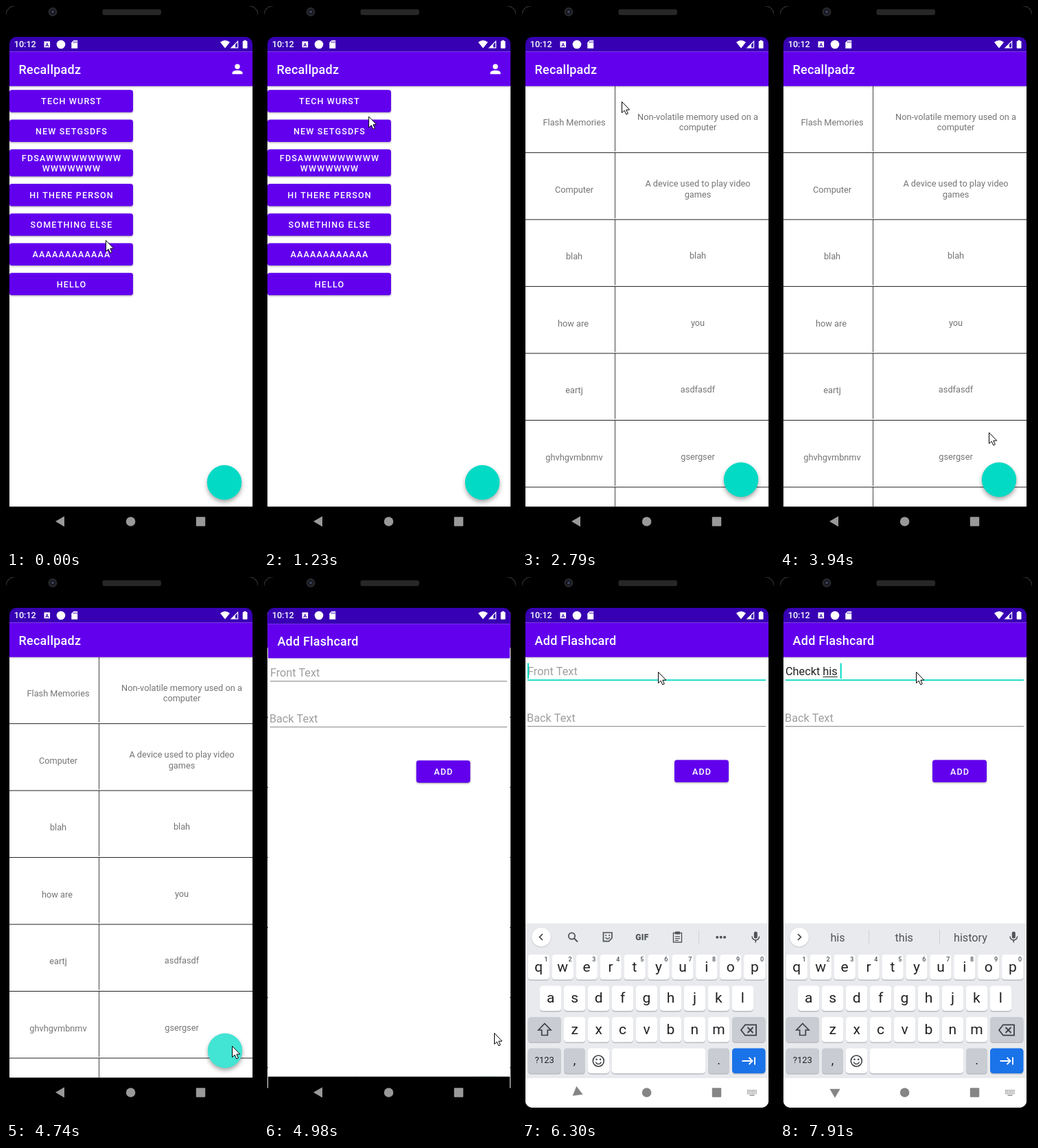
An HTML page with a canvas that plays this animation: 367x791 px, repeating every 8000 ms.

```html
<!DOCTYPE html>
<html lang="en">
<head>
<meta charset="utf-8">
<title>Study cards</title>
<style>
html, body { margin: 0; width: 100%; height: 100%; overflow: hidden; background: #000; }
canvas { display: block; width: 367px; height: 791px; }
</style>
</head>
<body>
<canvas id="stage"></canvas>
<script>
const W = 367, H = 791, LOOP = 8000, STEP = 120;
const canvas = document.getElementById('stage');
const dpr = window.devicePixelRatio || 1;
canvas.width = W * dpr;
canvas.height = H * dpr;
const c = canvas.getContext('2d');

const PURPLE = '#6200ee', DARK = '#3700b3', TEAL = '#03dac5';
const INK = '#202124', SLATE = '#3c4043', GREY = '#505357';
const SCREEN = { x: 5, y: 45, w: 354, h: 728, midX: 182, midY: 409 };
const PRESS_SET = 2250, OPEN_SET = 2520, PRESS_FAB = 4620, OPEN_ADD = 4860;
const FOCUS = 5880, KEYS_UP = 6180, BLINK = 6570, TYPE = 6950;

// Mouse key points: time, x, y
const mousePath = [[0, 145, 341], [360, 330, 430], [600, 168, 204], [1470, 145, 141],
  [1720, 145, 139], [3070, 145, 139], [3320, 159, 181], [3940, 304, 621], [4480, 329, 683],
  [4860, 329, 683], [4980, 335, 664], [5490, 245, 187], [5880, 198, 138]];

const sets = ['TECH WURST', 'NEW SETGSDFS', 'FDSA' + 'W'.repeat(9) + '\n' + 'W'.repeat(7),
  'HI THERE PERSON', 'SOMETHING ELSE', 'A'.repeat(12), 'HELLO'];
const cards = [
  ['Flash Memories', 'Non-volatile memory used on a\ncomputer'],
  ['Computer', 'A device used to play video\ngames'],
  ['blah', 'blah'], ['how are ', 'you'], ['eartj', 'asdfasdf'], ['ghvhgvmbnmv', 'gsergser']];
const keystrokes = 'Checkt his '.match(/ ?\S( $)?/g);
const vocabulary = ['his', 'this', 'history', 'check', 'checked', 'checking'];

const clamp = v => Math.max(0, Math.min(1, v));
const lerp = (a, b, p) => a + (b - a) * p;
const elapsed = (t, start) => Math.floor((t - start) / STEP) * STEP;

// Drawing helpers
function rect(x, y, w, h, color) { c.fillStyle = color; c.fillRect(x, y, w, h); }
function round(x, y, w, h, r, color) {
  c.beginPath(); c.roundRect(x, y, w, h, r); c.fillStyle = color; c.fill();
}
function disc(x, y, r, color) {
  c.beginPath(); c.arc(x, y, r, 0, 7); c.fillStyle = color; c.fill();
}
function poly(points, color) {
  c.beginPath(); points.forEach(([x, y]) => c.lineTo(x, y)); c.closePath();
  c.fillStyle = color; c.fill();
}
function line(points, color, width = 1.7, closed = false) {
  c.beginPath(); points.forEach(([x, y]) => c.lineTo(x, y));
  if (closed) c.closePath();
  c.strokeStyle = color; c.lineWidth = width; c.stroke();
}
function ring(x, y, r, color, width = 1.7, from = 0, to = 7) {
  c.beginPath(); c.arc(x, y, r, from, to);
  c.strokeStyle = color; c.lineWidth = width; c.stroke();
}
function text(str, x, y, size, color, { weight = 400, align = 'left', gap = 0 } = {}) {
  c.font = `${weight} ${size}px Roboto, sans-serif`;
  c.textAlign = align;
  c.letterSpacing = gap + 'px';
  c.fillStyle = color;
  c.fillText(str, x, y);
  const width = c.measureText(str).width;
  c.letterSpacing = '0px';
  return width;
}
function centered(str, x, y, size, color, style) {
  text(str, x, y, size, color, { align: 'center', ...style });
}
function paragraph(str, x, y, size, leading, color, style) {
  const lines = str.split('\n');
  lines.forEach((s, i) =>
    centered(s, x, y + (i - (lines.length - 1) / 2) * leading, size, color, style));
}
function shadowed(alpha, blur, dy, draw) {
  c.save();
  c.shadowColor = `rgba(0,0,0,${alpha})`;
  c.shadowBlur = blur * dpr;
  c.shadowOffsetY = dy * dpr;
  draw();
  c.restore();
}
function ripple(shape, x, y, r) {
  c.save(); c.beginPath(); shape(); c.clip();
  disc(x, y, r, 'rgba(255,255,255,.25)');
  c.restore();
}

// App screens
function button(label, x, y, w, press) {
  const h = label.includes('\n') ? 39.5 : 32.5;
  shadowed(0.32, 2.5, 1.2, () => round(x, y, w, h, 3.6, PURPLE));
  if (press) ripple(() => c.roundRect(x, y, w, h, 3.6), ...press);
  paragraph(label, x + w / 2 + 0.5, y + h / 2 + 4.7, 12.6, 14.8, '#fff', { weight: 500, gap: 1.125 });
}
function fab(x, y, press) {
  shadowed(0.35, 6, 3.5, () => disc(x, y, 25.2, TEAL));
  if (press) ripple(() => c.arc(x, y, 25.2, 0, 7), ...press);
}
function appWindow(title, body) {
  rect(5, 45, 354, 22, DARK);
  rect(5, 66.5, 354, 663, '#fff');
  rect(5, 729.5, 354, 43.5, '#000');
  body();
  c.save();
  c.beginPath(); c.rect(5, 66, 354, 663); c.clip();
  shadowed(0.3, 3, 1, () => rect(5, 66.5, 354, 50.2, PURPLE));
  c.restore();
  text(title, 18.6, 98.8, 18, '#fff', { weight: 500, gap: 0.225 });
}
function setsScreen(t) {
  const p = clamp(elapsed(t, PRESS_SET) / STEP);
  const press = t >= PRESS_SET && [lerp(142, 118, p), 139, lerp(36, 82, p)];
  appWindow('Recallpadz', () => {
    let y = 122.3;
    sets.forEach((s, i) => {
      button(s, 5, y, 180, i === 0 && press);
      y += s.includes('\n') ? 50.2 : 43.25;
    });
    fab(318, 694);
  });
  disc(337, 88.2, 3.7, '#fff');
  c.beginPath(); c.moveTo(329.5, 99.2); c.lineTo(329.5, 97.4);
  c.bezierCurveTo(329.5, 92.4, 344.5, 92.4, 344.5, 97.4); c.lineTo(344.5, 99.2);
  c.fill();
}
function cardsScreen(t) {
  const p = clamp((elapsed(t, PRESS_FAB) + 80) / 200);
  const press = t >= PRESS_FAB && [lerp(329, 319, p), lerp(683, 690, p), lerp(8, 26, p)];
  appWindow('Recallpadz', () => {
    for (let i = 0; i < 7; i++) {
      const y = 115.7 + i * 97.45;
      rect(135, y, 1, Math.min(96, 729.5 - y), '#444');
      if (i) rect(5, y, 354, 1, '#222');
      if (!cards[i]) continue;
      const [front, back] = cards[i];
      centered(front, 76, y + 58.6, 12.75, '#757575');
      paragraph(back, 256, y + 57.8, 12.75, 15.3, '#757575');
    }
    fab(319, 690, press);
  });
}
function typedText(t) {
  return t < TYPE ? '' : keystrokes.slice(0, 1 + elapsed(t, TYPE) / STEP).join('');
}
function addScreen(t) {
  const focused = t >= FOCUS, str = typedText(t);
  appWindow('Add Flashcard', () => {
    let caret = 8;
    if (str) {
      caret += text(str, 8, 143.2, 16.3, '#222');
      const start = str.trim().lastIndexOf(' ') + 1;
      const from = 8 + c.measureText(str.slice(0, start)).width;
      rect(from, 145, c.measureText(str.slice(start).trim()).width, 1, '#222');
    } else text('Front Text', 8, 143.2, 16.3, '#9e9e9e');
    if (focused) {
      rect(8, 149.3, 347, 1.8, TEAL);
      if (t < BLINK || str) rect(caret, 125.5, 2, 22.5, TEAL);
    } else rect(8, 150, 347, 1, '#7c7c7c');
    text('Back Text', 7, 210.7, 16.3, '#9e9e9e');
    rect(8, 217, 347, 1, '#8a8a8a');
    button('ADD', 222, 266.6, 79);
  });
}

// Keyboard
function key(x, y, w, color, label, size) {
  round(x, y + 1, w, 37, 4.5, '#b9bcc2');
  round(x, y, w, 36.6, 4.5, color);
  if (label) centered(label, x + w / 2, y + 17 + size * 0.37, size, INK);
}
function mic() {
  round(337.8, 516.5, 5, 10, 2.5, GREY);
  ring(340.3, 523.6, 5.3, GREY, 1.5, 0, Math.PI);
  rect(339.5, 528.5, 1.6, 4, GREY);
}
function toolIcons() {
  ring(72.5, 523, 4.6, GREY, 1.8);
  line([[76, 526.5], [81, 531.5]], GREY, 2);
  line([[118.5, 518], [131, 518], [131, 526], [126.5, 530.7], [118.5, 530.7]], GREY, 1.7, true);
  disc(122.2, 522, 1.1, GREY); disc(127.2, 522, 1.1, GREY);
  ring(124.7, 524, 3, GREY, 1.4, 0.2, 2.9);
  centered('GIF', 175, 528.5, 12, GREY, { weight: 900, gap: 0.4 });
  c.strokeRect(220.5, 518.5, 12, 13.5);
  rect(223, 516.5, 7, 4, GREY);
  for (let i = 0; i < 3; i++) {
    rect(223, 523.2 + i * 2.8, i < 2 ? 7 : 5, 1.2, GREY);
    disc(284.3 + i * 5.4, 524.7, 2, GREY);
  }
  rect(257, 515, 1, 20, '#cfd1d5');
}
function suggestions(str) {
  const word = str.trim().split(' ').pop();
  const capital = word !== word.toLowerCase();
  vocabulary.filter(w => w.includes(word.toLowerCase().slice(0, 5))).slice(capital ? -3 : 0)
    .slice(0, 3).forEach((w, i) => {
      centered(capital ? w[0].toUpperCase() + w.slice(1) : w, 84 + 96.7 * i, 531, 16.2, GREY);
      if (i) rect(26 + 103 * i, 514, 1, 21, '#cfd1d5');
    });
}
function keyboard(t) {
  const str = typedText(t), d = str ? -1 : 1;
  rect(5, 504.5, 354, 269, '#e8eaed');
  shadowed(0.2, 2, 0.7, () => disc(28, 524.6, 13.8, '#fff'));
  line([[28 + 2 * d, 520], [28 - 2.4 * d, 524.5], [28 + 2 * d, 529]], SLATE);
  if (str) suggestions(str); else toolIcons();
  mic();

  const pitch = 34.95, rowY = r => 550 + r * 45.5;
  ['qwertyuiop', 'asdfghjkl', 'zxcvbnm'].forEach((row, r) => {
    [...row].forEach((ch, i) => {
      const x = 181.5 + (i - (row.length - 1) / 2) * pitch;
      key(x - 15.7, rowY(r), 31.4, '#fff', ch, 21);
      if (!r) centered(String((i + 1) % 10), x + 10.8, 560, 9, '#4a4d51', { weight: 500 });
    });
  });
  const mod = '#c9ccd2', y3 = rowY(2), y4 = rowY(3);
  key(8.7, y3, 48.3, mod);
  key(306, y3, 48.5, mod);
  key(8.7, y4, 48.3, mod, '?123', 13);
  key(61, y4, 31, mod, ',', 18);
  key(95.8, y4, 31.2, '#fff');
  key(130.7, y4, 136.5, '#fff');
  key(271, y4, 31, mod, '.', 18);
  key(306, y4, 48.5, '#1a73e8');

  line([[33, 650.5], [42, 660], [37.3, 660], [37.3, 667.5], [28.7, 667.5], [28.7, 660], [24, 660]],
    SLATE, 1.7, true);
  line([[319, 660], [325, 652.3], [341, 652.3], [341, 667.7], [325, 667.7]], SLATE, 1.8, true);
  line([[328.5, 656], [336.5, 664]], SLATE, 1.8);
  line([[336.5, 656], [328.5, 664]], SLATE, 1.8);
  ring(111.3, 705, 8, SLATE, 1.6);
  disc(108.5, 702.7, 1.3, SLATE); disc(114.1, 702.7, 1.3, SLATE);
  ring(111.3, 705.5, 4, SLATE, 1.5, 0.2, 2.94);
  line([[320.5, 705], [335, 705]], '#fff', 1.9);
  line([[330.5, 700], [335.5, 705], [330.5, 710]], '#fff', 1.9);
  line([[339, 699.5], [339, 710.5]], '#fff', 1.9);
}

// System layer
function statusBar() {
  text('10:12', 11.8, 60.4, 12.6, '#fff', { weight: 500 });
  rect(55.5, 51.5, 8.6, 8.8, '#fff');
  centered('A', 59.8, 58.8, 7.5, DARK, { weight: 700 });
  disc(80, 56, 6.3, '#fff');
  poly([[98.5, 50], [104.2, 50], [104.2, 61.7], [95.3, 61.7], [95.3, 53.3]], '#fff');
  for (let i = 0; i < 3; i++) rect(98.2 + i * 2.1, 51.5, 1, 2.2, DARK);
  c.beginPath(); c.moveTo(319, 61.5); c.lineTo(312, 52.8);
  c.quadraticCurveTo(319, 47.4, 326, 52.8); c.closePath();
  c.fillStyle = '#fff'; c.fill();
  poly([[338.2, 50], [338.2, 61.5], [326.7, 61.5]], '#fff');
  poly([[337, 53], [337, 60.3], [334, 60.3], [334, 56]], DARK);
  round(344.7, 51, 6.8, 10.8, 1, '#fff');
  rect(346.6, 49.8, 3, 2, '#fff');
}
function navBar(t) {
  const up = t >= KEYS_UP, color = up ? '#858585' : '#999';
  const turn = clamp(elapsed(t, KEYS_UP) / (2 * STEP)) ** 1.25;
  if (up) rect(5, 730, 354, 43, '#fff');
  c.save();
  c.translate(80, 750.8);
  c.rotate(-turn * Math.PI / 2);
  poly([[-8, 0], [5, -7.6], [5, 7.6]], color);
  c.restore();
  disc(181.6, 751, 6.8, color);
  round(276.8, 744.3, 13.4, 13.4, 1, color);
  if (!up) return;
  for (let r = 0; r < 3; r++)
    for (let i = 0; i < 6; i++) rect(328 + i * 2.4, 747 + r * 2.4, 1.5, 1.5, color);
  rect(331.5, 754.4, 7, 1.3, color);
}
function bezel() {
  rect(0, 0, W, H, '#000');
  ring(13, 13, 13, '#333', 1.2, Math.PI, Math.PI * 1.5);
  ring(W - 13, 13, 13, '#333', 1.2, Math.PI * 1.5, Math.PI * 2);
  disc(68, 8.5, 6.5, '#26272b');
  disc(68, 8.5, 3.8, '#14151c');
  disc(68, 8.5, 1.9, '#3d4460');
  round(140.5, 4.7, 85.5, 8.5, 3, '#272727');
}
function mouse(t) {
  const i = mousePath.findLastIndex(k => k[0] <= t);
  const [t0, x0, y0] = mousePath[i];
  const [t1, x1, y1] = mousePath[i + 1] ?? [LOOP, x0, y0];
  const p = elapsed(t, t0) / (t1 - t0);
  c.save();
  c.translate(lerp(x0, x1, p) + 0.5, lerp(y0, y1, p) + 0.5);
  const arrow = [[0, 0], [0, 16], [3.7, 12.7], [6.2, 18.3], [8.8, 17.2], [6.3, 11.8], [11.2, 11.6]];
  poly(arrow, '#fff');
  line(arrow, '#000', 1, true);
  c.restore();
}

function zoomed(draw, t, scale, alpha = 1) {
  c.save();
  c.translate(SCREEN.midX, SCREEN.midY);
  c.scale(scale, scale);
  c.translate(-SCREEN.midX, -SCREEN.midY);
  c.globalAlpha = alpha;
  draw(t);
  c.restore();
}
function opening(from, to, start, t) {
  const x = clamp((elapsed(t, start) + 10) / 250);
  if (t < start) return from(t);
  if (x === 1) return to(t);
  const p = 1 - (1 - x) ** 4;
  zoomed(from, t, 1 + 0.05 * p);
  zoomed(to, t, 0.9 + 0.1 * p, clamp((x - 0.08) / 0.28));
}

function render(t) {
  c.setTransform(dpr, 0, 0, dpr, 0, 0);
  bezel();
  c.save();
  c.beginPath(); c.roundRect(SCREEN.x, SCREEN.y, SCREEN.w, SCREEN.h, 10); c.clip();
  if (t < PRESS_FAB) opening(setsScreen, cardsScreen, OPEN_SET, t);
  else opening(cardsScreen, addScreen, OPEN_ADD, t);
  if (t >= KEYS_UP) {
    c.save();
    c.translate(0, 268 * (1 - clamp((elapsed(t, KEYS_UP) + 80) / 200)) ** 3);
    keyboard(t);
    c.restore();
  }
  statusBar();
  navBar(t);
  c.restore();
  mouse(t);
}

let origin = null;
function loop(now) {
  origin ??= now;
  render((now - origin) % LOOP);
  requestAnimationFrame(loop);
}
requestAnimationFrame(loop);
</script>
</body>
</html>
```
